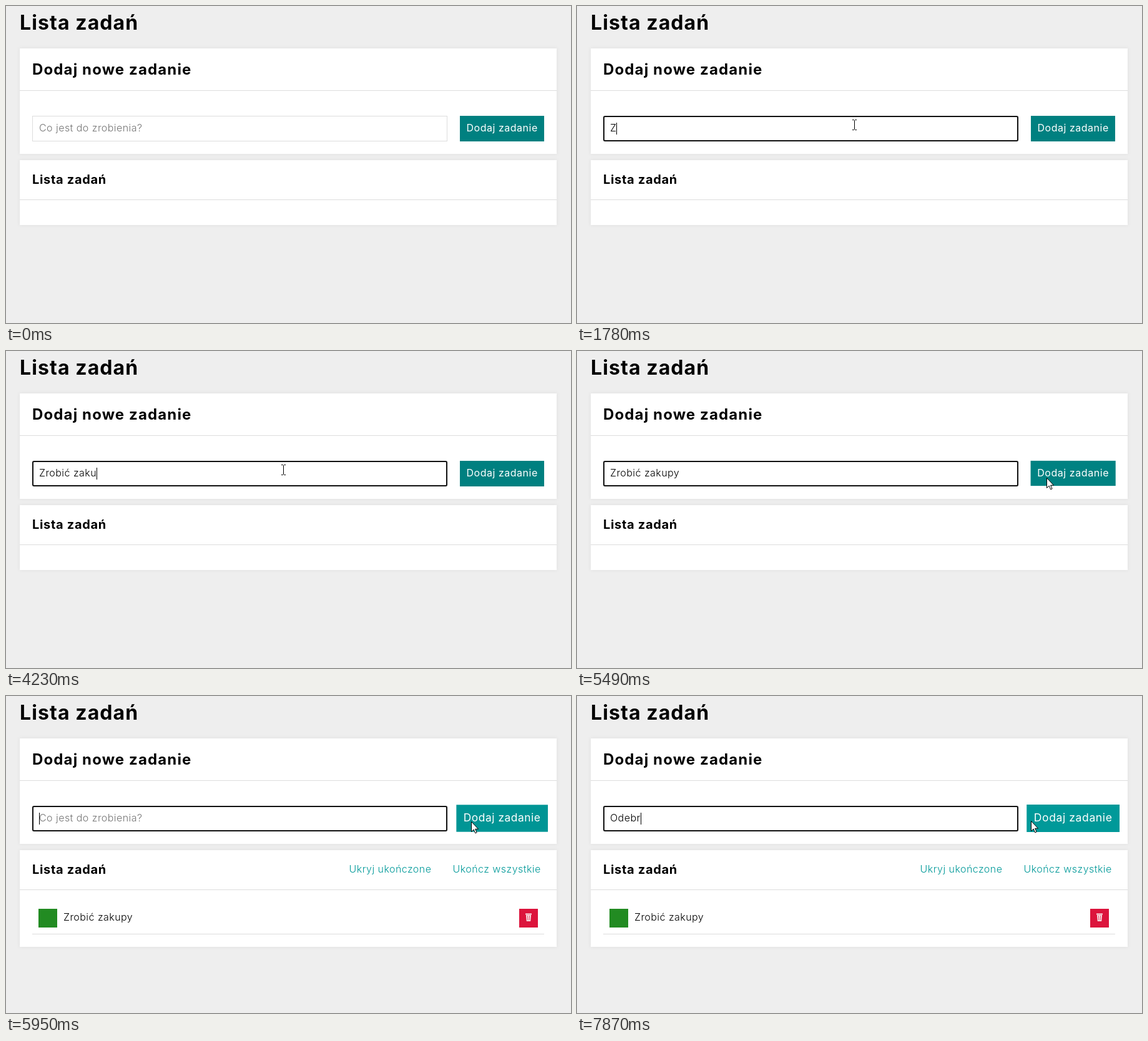
Write an HTML page that moves like this. It is 905x508 px and loops after 8000 ms.

```html
<!DOCTYPE html>
<html lang="pl">
<head>
<meta charset="utf-8">
<title>Lista zadań</title>
<style>
  html, body { margin: 0; width: 100%; height: 100%; overflow: hidden; background: #eee; }
  svg { display: block; width: 905px; height: 508px; }
  text { font: 300 16px Inter, "Open Sans", sans-serif; letter-spacing: .45px; white-space: pre; }
  .head { font-weight: 700; letter-spacing: .034em; }
  .panel { fill: #fff; filter: drop-shadow(0 0 2.5px #ddd); }
  .line { fill: #ddd; }
  .link { fill: #099; }
</style>
</head>
<body>
<svg viewBox="0 0 905 508">
  <text class="head" x="22" y="38" style="font-size:32px">Lista zadań</text>

  <rect class="panel" x="22" y="68" width="860" height="169"/>
  <rect class="line" x="22" y="135" width="860" height="1"/>
  <text class="head" x="42" y="110" style="font-size:24px;letter-spacing:.047em">Dodaj nowe zadanie</text>
  <rect x="42.5" y="176.5" width="664" height="40" fill="#fff" stroke="#ddd"/>
  <rect id="ring" x="43" y="177" width="663" height="39" rx="2" fill="none" stroke="#101010" stroke-width="2"/>
  <text id="entry" x="53" y="201"></text>
  <rect id="caret" y="187" width="1" height="19"/>
  <g id="button">
    <rect id="face" x="727" y="176"/>
    <text x="737.5" y="201" fill="#fff" style="font-weight:400;letter-spacing:.52px">Dodaj zadanie</text>
  </g>

  <rect id="list" class="panel" x="22" y="247" width="860"/>
  <rect class="line" x="22" y="310" width="860" height="1"/>
  <text class="head" x="42" y="285" style="font-size:20px">Lista zadań</text>
  <g id="task">
    <text class="link" x="549.5" y="283">Ukryj ukończone</text>
    <text class="link" x="715.5" y="283">Ukończ wszystkie</text>
    <rect x="52" y="341" width="30" height="30" fill="#228b22"/>
    <text x="92" y="360">Zrobić zakupy</text>
    <rect x="822" y="341" width="30" height="30" fill="#dc143c"/>
    <path d="M832 348.5h10v2h-10zM833 351h8l-.8 10h-6.4z" fill="#f8e6e8"/>
    <path d="M835.5 352l.3 7.5M838.5 352l-.3 7.5" stroke="#dc143c" stroke-width=".8"/>
    <rect class="line" x="42" y="381" width="820" height="1"/>
  </g>

  <path id="arrow" d="M.5.5V16.5L4.2 13l2.5 5.8 2.4-1-2.5-5.6H11.5z" fill="#fff" stroke="#000"/>
  <path id="beam" d="M-3-7.5h2.5l1 1 1-1H4M.5-6.5v14M-3 8.5h2.5l1-1 1 1H4" fill="none" stroke="#000"/>
</svg>
<script>
const LOOP = 8000, FOCUS = 920, HOVER = 5415, CLICK = 5620, BLINK = 530;
const words = [
  { text: 'Zrobić zakupy', keys: [1780, 2110, 2250, 2510, 2640, 2970, 3240, 3770, 3900, 4030, 4230, 4360, 4490] },
  { text: 'Odebr', keys: [6750, 7410, 7540, 7740, 7870] }
];
// time, x, y of the pointer tip
const path = [
  [-250, 874, 577], [850, 444, 190], [5000, 444, 190], [5480, 752, 203],
  [5540, 752, 203], [5680, 757, 201.5], [5800, 757, 201.5], [6150, 727, 200]
];

const el = id => document.getElementById(id);
const show = (id, on) => el(id).setAttribute('visibility', on ? 'visible' : 'hidden');
function set(id, attrs) {
  for (const name in attrs) el(id).setAttribute(name, attrs[name]);
}

// Same curve as the CSS "ease" timing
function ease(p) {
  if (p <= 0) return 0;
  if (p >= 1) return 1;
  const bez = (a, b, s) => 3 * (1 - s) ** 2 * s * a + 3 * (1 - s) * s * s * b + s ** 3;
  let lo = 0, hi = 1;
  for (let i = 0; i < 20; i++) {
    const mid = (lo + hi) / 2;
    if (bez(.25, .25, mid) < p) lo = mid; else hi = mid;
  }
  return bez(.1, 1, lo);
}

function pointer(t) {
  const i = path.findIndex(p => p[0] > t);
  if (i < 0) return path[path.length - 1].slice(1);
  const a = path[i - 1], b = path[i];
  const p = (t - a[0]) / (b[0] - a[0]), s = p * p * (3 - 2 * p);
  return [1, 2].map(k => Math.round(a[k] + (b[k] - a[k]) * s));
}

function drawField(t) {
  const word = words[t < CLICK ? 0 : 1];
  const typed = word.text.slice(0, word.keys.filter(k => k <= t).length);
  const entry = el('entry');
  entry.textContent = typed;
  const width = typed ? entry.getComputedTextLength() : 0;
  if (!typed) entry.textContent = 'Co jest do zrobienia?';
  entry.setAttribute('fill', typed ? '#000' : '#757575');

  const events = [FOCUS, CLICK, ...words.flatMap(w => w.keys)];
  const last = Math.max(...events.filter(e => e <= t));
  const focused = t >= FOCUS;
  show('ring', focused);
  set('caret', { x: Math.round(53 + width) });
  show('caret', focused && (t - last) % (2 * BLINK) < BLINK);
}

function drawButton(t) {
  const h = ease((t - HOVER) / 1000), shade = 128 + 25 * h;
  set('button', { transform: `translate(794.6 196) scale(${1 + .1 * h}) translate(-794.6 -196)` });
  // The box snaps to whole pixels until it starts to grow
  set('face', { width: h ? 135.3 : 135, height: h ? 40 : 41, fill: `rgb(0,${shade},${shade})` });
}

function draw(t) {
  drawField(t);
  drawButton(t);
  set('list', { height: t < CLICK ? 104 : 155 });
  show('task', t >= CLICK);

  const [x, y] = pointer(t);
  const inField = x > 42 && x < 707 && y > 176 && y < 217;
  for (const id of ['arrow', 'beam']) set(id, { transform: `translate(${x} ${y})` });
  show('arrow', !inField);
  show('beam', inField);
}

const start = performance.now();
function frame() {
  draw((performance.now() - start) % LOOP);
  requestAnimationFrame(frame);
}
frame();
</script>
</body>
</html>
```
